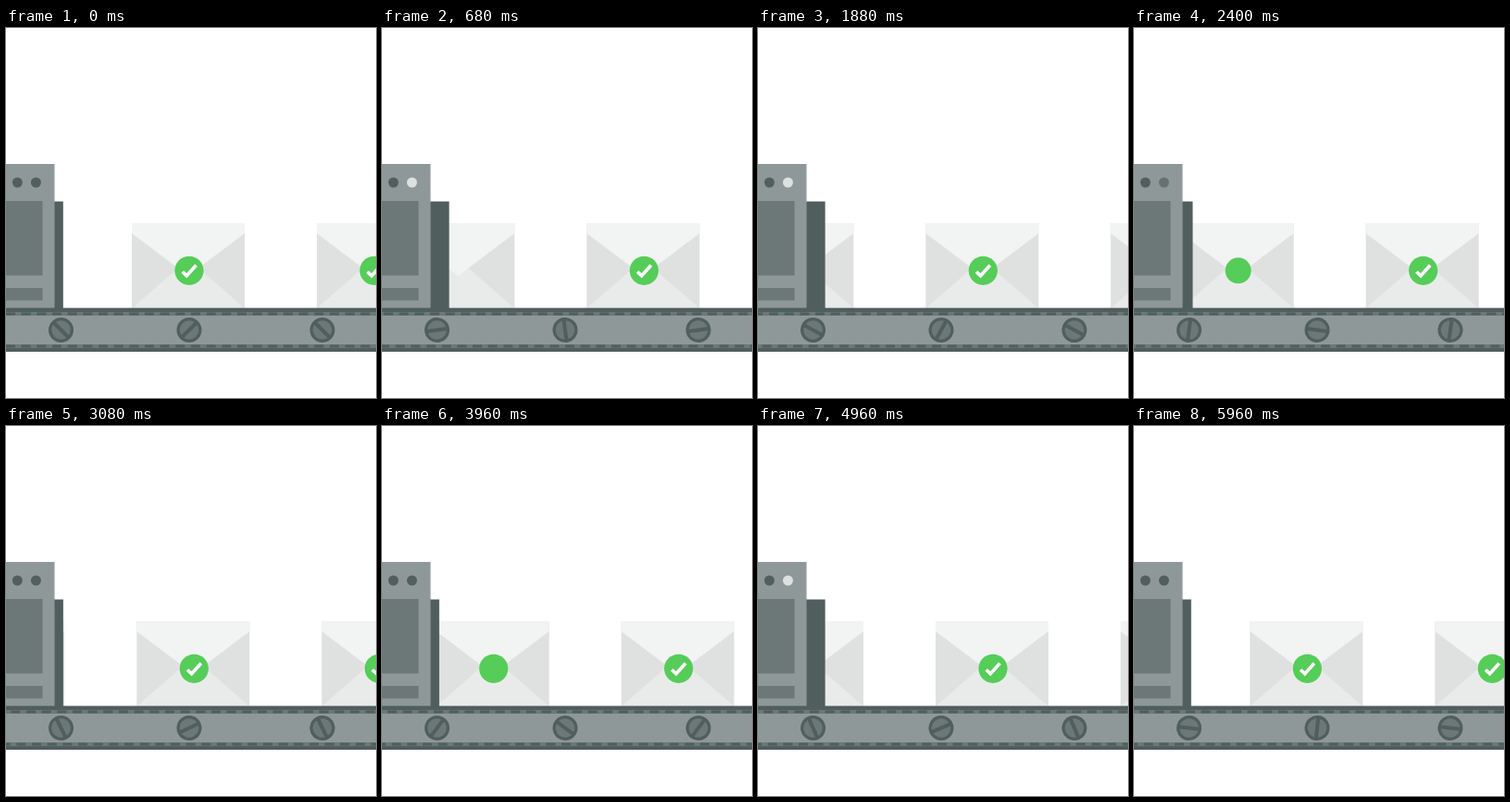
Animation of 400x400 px, one loop 6 s. Source, as an HTML page:

```html
<!DOCTYPE html>
<html lang="en">
<head>
<meta charset="utf-8">
<title>Envelope conveyor</title>
<style>
  html, body { margin: 0; width: 100%; height: 100%; overflow: hidden; background: #fff; }
  svg { display: block; width: 100%; height: 100%; }
  .body { fill: #8f9898; }
  .inset { fill: #6c7878; }
  .dark { fill: #505e5e; }
  .dash { stroke: #505e5e; stroke-width: 3; stroke-dasharray: 10 6.6667; }
</style>
</head>
<body>
<svg viewBox="0 0 400 400">
  <defs>
    <g id="paper">
      <rect width="122" height="92" fill="#dfe1e1"/>
      <path d="M0 92 61 39 122 92Z" fill="#e9ebeb"/>
      <path d="M0 0H122V11L61 57 0 11Z" fill="#f2f3f3"/>
    </g>
    <g id="screw">
      <circle r="13.5" class="dark"/>
      <circle r="10.3" class="inset"/>
      <rect x="-11" y="-2" width="22" height="4" class="dark"/>
    </g>
  </defs>

  <g id="mail"></g>

  <rect id="panel" x="50" y="187.5" height="116" class="dark"/>
  <rect y="147" width="52.5" height="156" class="body"/>
  <rect y="187" width="39.5" height="80.5" class="inset"/>
  <rect y="281" width="39.5" height="13.5" class="inset"/>
  <circle cx="12.3" cy="167" r="5.5" class="dark"/>
  <circle id="lamp" cx="32.4" cy="167" r="5.5"/>

  <rect y="302.6" width="400" height="47.4" class="dark"/>
  <rect y="307" width="400" height="39" class="inset"/>
  <rect y="311" width="400" height="31" class="body"/>
  <path id="topDash" class="dash" d="M0 309H400"/>
  <path id="lowDash" class="dash" d="M0 344H400"/>
  <g id="screws"></g>
</svg>

<script>
  const LOOP = 6000, STEP = 40;
  const GAP = 200, START = 136, SPEED = 16 / 3;   // px, px, px per step
  const TURN = 3.6;                               // screw degrees per px
  const NS = 'http://www.w3.org/2000/svg';
  const $ = id => document.getElementById(id);

  function group(parent, markup) {
    const g = document.createElementNS(NS, 'g');
    g.innerHTML = markup;
    parent.append(g);
    return g;
  }

  const letters = [-1, 0, 1].map(slot => {
    const el = group($('mail'), `<use href="#paper"/>
      <g class="seal">
        <circle r="15.6" fill="#55cd58"/>
        <path class="tick" d="M-7.3 1.2-2.7 5.6 7.5-5.8" fill="none" stroke="#fff" stroke-width="3.7"/>
      </g>`);
    return { slot, el, seal: el.querySelector('.seal'), tick: el.querySelector('.tick') };
  });

  const screws = [[59.5, 45], [198, 135], [342, 45]].map(([x, angle]) =>
    ({ x, angle, el: group($('screws'), '<use href="#screw"/>') }));

  // Sine ease from 0 to 1 while x goes from a to b.
  function ease(a, b, x) {
    const k = Math.min(1, Math.max(0, (x - a) / (b - a)));
    return (1 - Math.cos(Math.PI * k)) / 2;
  }

  const mix = (a, b, k) => Math.round(a + (b - a) * k);
  const move = (el, value) => el.setAttribute('transform', value);

  function draw(time) {
    // The first pose lasts two steps.
    const step = Math.max(0, Math.floor((time % LOOP + 0.5) / STEP) - 1);
    const run = step * SPEED;
    const pos = (START + run) % GAP;

    for (const { slot, el, seal, tick } of letters) {
      const x = pos + slot * GAP;
      move(el, `translate(${x} 211)`);
      move(seal, `translate(62 51.3) scale(${ease(19, 59, x)})`);
      move(tick, `scale(${ease(75, 115, x)})`);
    }

    const push = pos > GAP / 2 ? ease(139, 179, pos) : 1 - ease(21, 61, pos);
    $('panel').setAttribute('width', 11.8 + 10.8 * push);
    $('lamp').setAttribute('fill',
      `rgb(${mix(80, 220, push)},${mix(94, 224, push)},${mix(94, 223, push)})`);

    $('topDash').setAttribute('stroke-dashoffset', -run);
    $('lowDash').setAttribute('stroke-dashoffset', run);
    for (const { x, angle, el } of screws)
      move(el, `translate(${x} 326.5) rotate(${angle + run * TURN})`);
  }

  const begin = performance.now();
  function tickClock() {
    draw(performance.now() - begin);
    requestAnimationFrame(tickClock);
  }
  tickClock();
</script>
</body>
</html>
```
